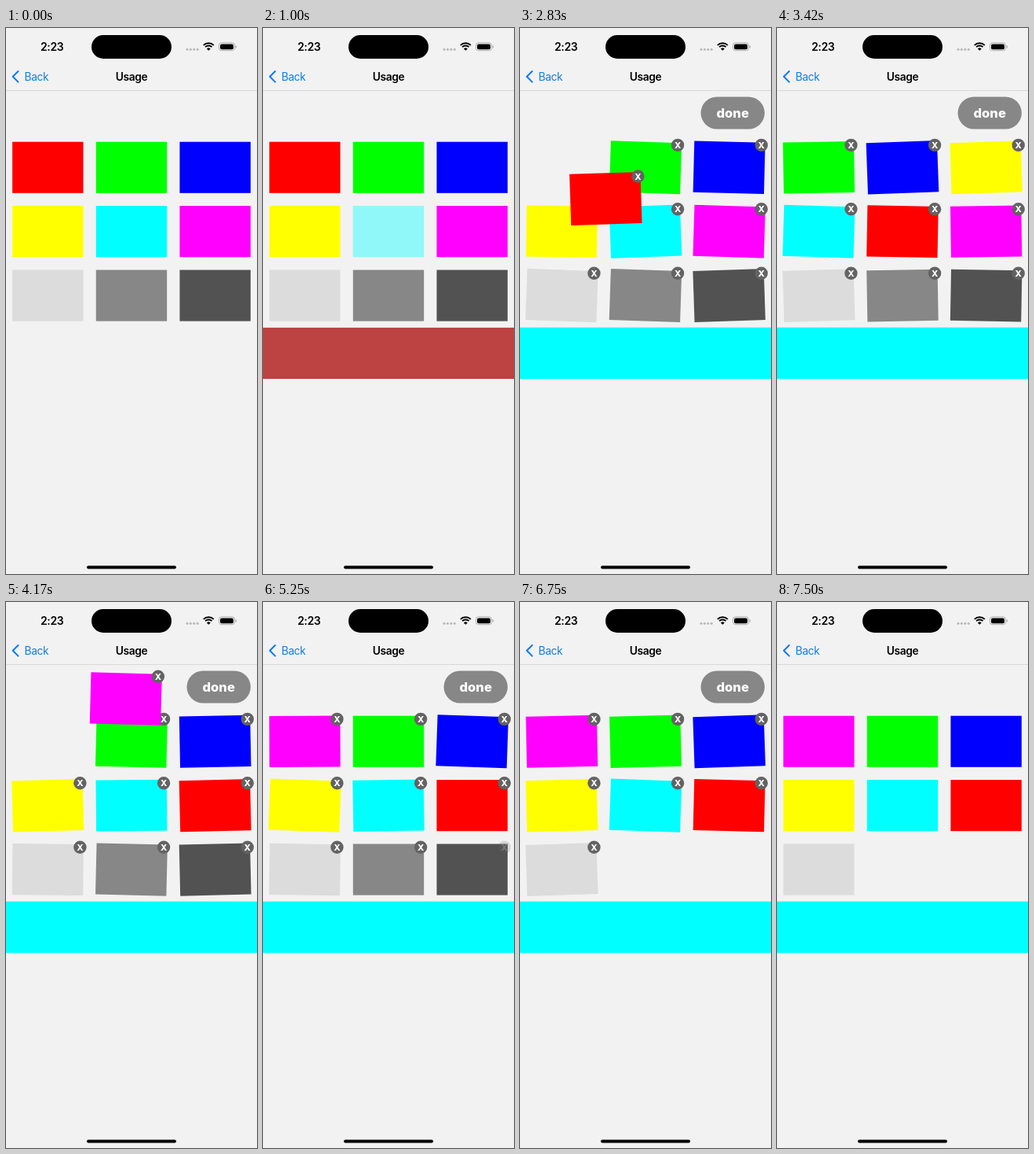
An HTML page with a canvas for the animation above (8010 ms loop, 320x694 px).

```html
<!DOCTYPE html>
<html lang="en">
<head>
<meta charset="utf-8">
<title>Reorderable grid</title>
<style>
  html, body { margin: 0; width: 100%; height: 100%; overflow: hidden; background: #f2f2f2; }
  canvas { display: block; width: 320px; height: 694px; }
</style>
</head>
<body>
<canvas id="stage"></canvas>
<script>
const W = 320, H = 694, LOOP = 8010, FRAME = 1000 / 12;
const CELL_W = 90.4, CELL_H = 65.1;
const EDIT_START = 1910, EDIT_END = 7170;
const canvas = document.getElementById('stage');
const ctx = canvas.getContext('2d');
const dpr = window.devicePixelRatio || 1;
canvas.width = W * dpr;
canvas.height = H * dpr;

// phase: offset of the wobble, in turns
const cells = [
  { color: '#ff0000', phase: .5 },
  { color: '#00ff00', phase: 0 },
  { color: '#0000ff', phase: .2 },
  { color: '#ffff00', phase: .25 },
  { color: '#00ffff', phase: .57 },
  { color: '#ff00ff', phase: -.02 },
  { color: '#dcdcdc', phase: .07 },
  { color: '#878787', phase: 0, press: 6320, gone: 6400 },
  { color: '#525252', phase: .5, press: 5240, gone: 5330 }
];
const orders = [
  { at: 0, ids: [0, 1, 2, 3, 4, 5, 6, 7, 8] },
  { at: 2860, ids: [1, 2, 3, 4, 0, 5, 6, 7, 8] },
  { at: 3850, ids: [5, 1, 2, 3, 4, 0, 6, 7, 8] }
];
// drag paths: [time, x, y] of the cell's top left corner
const drags = {
  0: [[2420, 8.1, 144.7], [2840, 65, 185], [3160, 118, 232], [3340, 114.8, 226.1]],
  5: [[3580, 221.5, 226.1], [3880, 182, 125], [4167, 107.5, 90.5], [4417, 22, 124], [4580, 8.1, 144.7]]
};
const taps = [{ id: 0, at: 380 }, { id: 4, at: 880 }];

const lerp = (a, b, k) => a + (b - a) * k;
function ease(t, from, to) {
  const k = Math.min(1, Math.max(0, (t - from) / (to - from)));
  return k * k * (3 - 2 * k);
}
const slot = n => [8.1 + n % 3 * 106.67, 144.7 + Math.floor(n / 3) * 81.4];

function dragPosition(id, t) {
  const path = drags[id];
  if (!path || t < path[0][0]) return null;
  const next = path.findIndex(p => p[0] > t);
  if (next < 0) return null;
  const a = path[next - 1], b = path[next];
  const k = (t - a[0]) / (b[0] - a[0]);
  return [lerp(a[1], b[1], k), lerp(a[2], b[2], k)];
}

function gridPosition(id, t) {
  let [x, y] = slot(id);
  for (const { at, ids } of orders.slice(1)) {
    const k = ease(t, at, at + 250), [nx, ny] = slot(ids.indexOf(id));
    x = lerp(x, nx, k);
    y = lerp(y, ny, k);
  }
  return [x, y];
}

function pressAlpha(id, t) {
  if (id === 3 && t >= 1410) return lerp(.2, 1, ease(t, 2090, 2420));
  const tap = taps.find(p => p.id === id && t >= p.at);
  return tap ? lerp(.2, 1, ease(t, tap.at, tap.at + 360)) : 1;
}

function text(str, x, y, font, color, spacing = 0, align = 'center') {
  ctx.font = font + ' Inter, sans-serif';
  ctx.letterSpacing = spacing + 'px';
  ctx.textAlign = align;
  ctx.fillStyle = color;
  ctx.fillText(str, x, y);
}
function pill(x, y, w, h, r, color) {
  ctx.fillStyle = color;
  ctx.beginPath();
  ctx.roundRect(x, y, w, h, r);
  ctx.fill();
}
function dot(x, y, r, color) {
  ctx.fillStyle = color;
  ctx.beginPath();
  ctx.arc(x, y, r, 0, 7);
  ctx.fill();
}

function drawBars() {
  text('2:23', 44, 28.8, '600 14px', '#000', -.4, 'left');
  pill(109, 9, 102, 30, 15, '#000');
  for (let i = 0; i < 4; i++) dot(231 + i * 4.4, 27.3, 1.5, '#b8b8b8');

  ctx.strokeStyle = '#000';
  ctx.lineWidth = 2;
  for (const r of [9.2, 6]) {
    ctx.beginPath();
    ctx.arc(258.3, 28.4, r, -Math.PI * .75, -Math.PI * .25);
    ctx.stroke();
  }
  ctx.fillStyle = '#000';
  ctx.beginPath();
  ctx.moveTo(258.3, 28.8);
  ctx.arc(258.3, 28.8, 3.4, -Math.PI * .75, -Math.PI * .25);
  ctx.fill();

  ctx.strokeStyle = '#a5a5a5';
  ctx.lineWidth = .9;
  ctx.beginPath();
  ctx.roundRect(271.5, 18.9, 20, 9.8, 3.2);
  ctx.stroke();
  pill(273, 20.4, 17, 6.8, 2, '#000');
  pill(292.6, 22.2, 1.2, 3.3, .6, '#a5a5a5');

  ctx.strokeStyle = '#007aff';
  ctx.lineWidth = 2;
  ctx.lineCap = ctx.lineJoin = 'round';
  ctx.beginPath();
  ctx.moveTo(15.5, 55);
  ctx.lineTo(8.7, 61.8);
  ctx.lineTo(15.5, 68.6);
  ctx.stroke();
  ctx.lineCap = 'butt';
  text('Back', 23.6, 66.8, '400 13.8px', '#0a7fe8', -.4, 'left');
  text('Usage', 160, 66.8, '600 13.8px', '#000', -.35);
  ctx.fillStyle = '#d2d2d2';
  ctx.fillRect(0, 79.2, W, .8);
  pill(103, 683.5, 114, 4, 2, '#000');
}

function drawCell(id, t, editing) {
  const { color, phase, press, gone } = cells[id];
  const visible = gone ? 1 - ease(t, gone, gone + 330) : 1;
  if (!visible) return;
  const [x, y] = dragPosition(id, t) || gridPosition(id, t);
  const wobble = t < EDIT_START ? 0 : 2.1 * Math.sin(2 * Math.PI * ((t - 5250) / 415 + phase)) * editing;

  ctx.save();
  ctx.globalAlpha = visible * pressAlpha(id, t);
  ctx.translate(x + CELL_W / 2, y + CELL_H / 2);
  ctx.rotate(wobble * Math.PI / 180);
  ctx.fillStyle = color;
  ctx.fillRect(-CELL_W / 2, -CELL_H / 2, CELL_W, CELL_H);
  ctx.restore();

  ctx.globalAlpha = visible * editing * (press && t >= press ? .2 : 1);
  dot(x + 86.3, y + 4.2, 8.2, '#636363');
  text('X', x + 86.3, y + 8.2, '800 11px', '#fff');
  ctx.globalAlpha = 1;
}

function drawSelection(t) {
  for (const { id, at } of taps) {
    ctx.globalAlpha = ease(t, at, at + 360);
    ctx.fillStyle = cells[id].color;
    ctx.fillRect(0, 380.9, W, CELL_H);
  }
  ctx.globalAlpha = 1;
}

function draw(t) {
  ctx.setTransform(dpr, 0, 0, dpr, 0, 0);
  ctx.fillStyle = '#f2f2f2';
  ctx.fillRect(0, 0, W, H);
  drawBars();
  drawSelection(t);

  const editing = ease(t, EDIT_START - 60, EDIT_START + 280) * (1 - ease(t, EDIT_END, EDIT_END + 320));
  ctx.globalAlpha = editing * (t > EDIT_END - 100 ? .4 : 1);
  pill(230.5, 87.5, 81.4, 41, 20.5, '#878787');
  text('done', 271.2, 113.8, '800 16.6px', '#fff');
  ctx.globalAlpha = 1;

  const ids = cells.map((_, id) => id);
  const dragged = ids.filter(id => dragPosition(id, t));
  const resting = ids.filter(id => !dragged.includes(id));
  for (const id of [...resting, ...dragged]) drawCell(id, t, editing);
}

const start = performance.now();
function tick() {
  const t = (performance.now() - start) % LOOP;
  draw(Math.floor((t + 4) / FRAME) * FRAME);
  requestAnimationFrame(tick);
}
tick();
</script>
</body>
</html>
```
